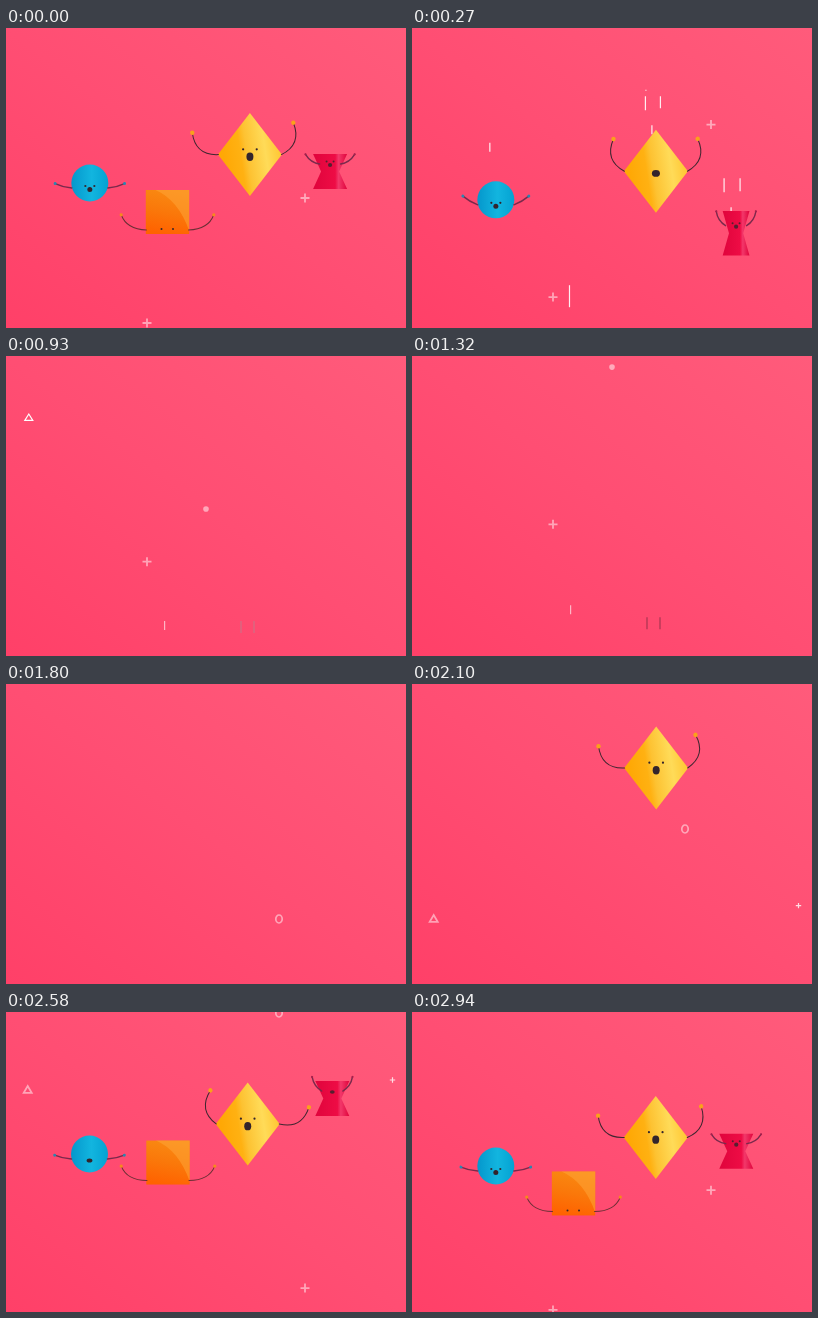
Animation of 400x300 px, one loop 2970 ms. Source, as an HTML page:

```html
<!DOCTYPE html>
<html lang="en">
<head>
<meta charset="utf-8">
<title>Falling shapes</title>
<style>
  html, body { margin: 0; width: 100%; height: 100%; overflow: hidden; background: #ff4d72; }
  svg { display: block; width: 100vw; height: 100vh; }
  .arm path { fill: none; stroke: #3f2630; stroke-width: 1; stroke-linecap: round; }
  .face { fill: #33242c; }
  .lines { stroke: #fff; stroke-width: 1.2; fill: none; }
  .bit { stroke: #fff; fill: none; }
  .soft { opacity: .5; filter: blur(.4px); }
  #circle, #red { filter: blur(.7px); }
  #square { filter: blur(.4px); }
  #circle .arm path, #red .arm path { stroke: #7a2a4c; stroke-width: 1.4; }
  #square .arm path { stroke: #6b2f35; }
</style>
</head>
<body>
<svg viewBox="0 0 400 300" preserveAspectRatio="none">
  <defs>
    <linearGradient id="sky" x1="0" y1="1" x2="1" y2="0">
      <stop offset="0" stop-color="#ff4068"/><stop offset=".5" stop-color="#ff4e73"/><stop offset="1" stop-color="#ff5b7b"/>
    </linearGradient>
    <linearGradient id="gold" x1="0" y1=".6" x2="1" y2=".4">
      <stop offset=".1" stop-color="#ffa805"/><stop offset=".36" stop-color="#ffb112"/>
      <stop offset=".46" stop-color="#fdc232"/><stop offset=".74" stop-color="#ffdb58"/><stop offset="1" stop-color="#ffc42e"/>
    </linearGradient>
    <linearGradient id="orange" x1=".6" y1="0" x2=".4" y2="1">
      <stop offset="0" stop-color="#f98a12"/><stop offset=".5" stop-color="#fa780a"/><stop offset="1" stop-color="#ff6200"/>
    </linearGradient>
    <linearGradient id="blue">
      <stop offset="0" stop-color="#0597cc"/><stop offset=".55" stop-color="#12b5df"/><stop offset="1" stop-color="#04a2d2"/>
    </linearGradient>
    <linearGradient id="crimson">
      <stop offset="0" stop-color="#e0043c"/><stop offset=".65" stop-color="#ee0c45"/>
      <stop offset=".75" stop-color="#f2386a"/><stop offset="1" stop-color="#e0043c"/>
    </linearGradient>
  </defs>
  <rect width="400" height="300" fill="url(#sky)"/>

  <path id="plusA" class="bit soft" d="M-4.5 0h9M0 -4.5v9" stroke-width="1.8"/>
  <path id="plusB" class="bit soft" d="M-4.5 0h9M0 -4.5v9" stroke-width="1.8"/>
  <path id="plusC" class="bit" d="M-2.7 0h5.4M0 -2.7v5.4" stroke-width="1.2" opacity=".8"/>
  <path id="triA" class="bit" d="M-4 3.2h8L0 -3.2z" stroke-width="1.2"/>
  <path id="triB" class="bit soft" d="M-4 3.4h8L0 -3.4z" stroke-width="1.8"/>
  <ellipse id="ring" class="bit soft" rx="3.2" ry="4" stroke-width="1.7"/>
  <circle id="dot" class="soft" r="2.8" fill="#fff"/>
  <path id="streakA" class="lines" d="M0 -4.5v9"/>
  <path id="streakB" class="lines" d="M0 -6v12"/>
  <path id="streakC" class="lines" d="M0 -6v12"/>

  <g id="circle">
    <path class="lines" d="M-6 -57v9" opacity=".6"/>
    <circle class="body" r="18.5" fill="url(#blue)"/>
    <g class="face" transform="translate(0 3)"><g class="eyes"><circle cx="-4.5" r="1.1"/><circle cx="4.5" r="1.1"/></g><g transform="translate(0 3.5)"><circle class="mouth" r="2.5"/></g></g>
  </g>
  <g id="square">
    <path class="lines" d="M-4 -73v22" opacity=".6"/>
    <g class="body"><rect x="-21.7" y="-22" width="43.4" height="44" fill="url(#orange)"/><path d="M-12 -22H21.7V19Q11 -12 -12 -22z" fill="#ffa438" opacity=".55"/></g>
    <g class="face" transform="translate(0 17)"><g class="eyes"><circle cx="-6" r="1"/><circle cx="5.5" r="1"/></g></g>
  </g>
  <g id="red">
    <path class="lines" d="M-12 -55v14M4 -55v13M-5 -26v6" opacity=".6"/>
    <path class="body" d="M-17 -17.5H17L9 0L17 17.5H-17L-9 0z" fill="url(#crimson)"/>
    <g class="face" transform="translate(0 -10)" opacity=".8"><g class="eyes"><circle cx="-3.5" r="1"/><circle cx="3.5" r="1"/></g><g transform="translate(0 3.5)"><circle class="mouth" r="2.1"/></g></g>
  </g>
  <g id="diamond">
    <path class="lines" d="M-10.5 -75v14M4.5 -75v12M-10 -81.5v1M-4 -46v9"/>
    <path class="body" d="M0 -41.5L32 0L0 41.5L-32 0z" fill="url(#gold)"/>
    <g class="face" transform="translate(0 -5.3)"><g class="eyes"><circle cx="-6.8" r="1.1"/><circle cx="6.8" r="1.1"/></g><g transform="translate(0 7.5)"><ellipse class="mouth" rx="3.5" ry="4.2"/></g></g>
  </g>
</svg>
<script>
const LOOP = 2970, STEP = 30;
const $ = id => document.getElementById(id);
const ramp = (t, from, to) => Math.min(1, Math.max(0, (t - from) / (to - from)));
// Swings around mid, lowest at the given time.
const wave = (mid, amp, period, low) => t => mid - amp * Math.cos(2 * Math.PI * (t - low) / period);

const flap = wave(9, 12, 1080, 2760), flutter = wave(9, 14, 900, 2900);
const wakeUp = t => ramp(t, 2600, 2900);

// x, y: place at the loop point; enter and drop: when the quick arrival and the fall begin.
const cast = [
  { id: 'diamond', x: 243, y: 126.6, glide: .0375, sway: 1.3, enter: 1920, drop: 3151,
    left: wave(20.5, 21, 855, 2955), right: wave(13.5, 24.5, 1080, 2580),
    shoulder: [31.5, 0], bend: [-23, 1], hand: [-26, -22], size: 2.2, tint: '#f9a11b',
    eyes: t => ramp(t, 3200, 3000) },
  { id: 'circle', x: 83.7, y: 155, glide: .033, sway: .2, enter: 2130, drop: 3145,
    left: flap, right: flap,
    shoulder: [18, 5], bend: [-9, 0], hand: [-17, -3], size: 1.5, tint: '#2a86b0', eyes: wakeUp },
  { id: 'square', x: 161.7, y: 184, glide: .085, sway: -.3, enter: 2190, drop: 3003,
    left: flap, right: flap,
    shoulder: [21, 18], bend: [-20, 1], hand: [-26.5, -13], size: 1.6, tint: '#f58a1c', eyes: wakeUp },
  { id: 'red', x: 325, y: 143.5, glide: .144, sway: -1.3, enter: 2250, drop: 3105, stretch: .27,
    left: flutter, right: flutter,
    shoulder: [10.5, -7.5], bend: [-9, -2], hand: [-13.5, -10.5], size: 1.1, tint: '#a5204c', eyes: wakeUp }
];

for (const c of cast) {
  c.el = $(c.id);
  const [hx, hy] = c.hand;
  const arm = `<g class="arm"><path d="M0 0Q${c.bend} ${c.hand}"/><circle cx="${hx}" cy="${hy}" r="${c.size}" fill="${c.tint}"/></g>`;
  c.el.insertAdjacentHTML('beforeend', arm + arm);
  c.arms = c.el.querySelectorAll('.arm');
  c.part = name => c.el.querySelector('.' + name);
}

const swing = wave(0, 1, 1080, 2565);

function height(c, t) {
  const arrival = 200 * Math.exp((c.enter - t) / 60);
  const fall = 250 * (Math.max(0, t - c.drop) / 300) ** 3;
  return c.y + c.glide * (t - LOOP) - arrival + fall;
}

function drawCharacter(c, t) {
  const y = height(c, t), visible = y > -60 && y < 380;
  c.el.style.display = visible ? '' : 'none';
  if (!visible) return;
  const [reach, level] = c.shoulder, awake = c.eyes(t);
  const long = 1 + (c.stretch || 0) * ramp(t, LOOP, 3240);
  const set = (el, value) => el.setAttribute('transform', value);
  set(c.el, `translate(${c.x + c.sway * swing(t)} ${y})`);
  set(c.part('body'), `scale(${1 / long} ${long})`);
  set(c.arms[0], `translate(${-reach} ${level}) rotate(${c.left(t)})`);
  set(c.arms[1], `translate(${reach} ${level}) scale(-1 1) rotate(${c.right(t)})`);
  c.part('eyes').style.opacity = awake;
  c.part('lines').style.opacity = .9 * ramp(t, c.drop - 30, c.drop + 80);
  const mouth = c.part('mouth');
  if (mouth) set(mouth, `scale(${1.15 - .15 * awake} ${.8 + .2 * awake})`);
}

// Marks rising at a steady speed, each known by one passing time and height.
const marks = [
  { id: 'plusA', x: 299, y: 170, at: 2970, speed: .272 },
  { id: 'plusB', x: 141, y: 295, at: 2970, speed: .096 },
  { id: 'plusC', x: 386.5, y: 68, at: 2580, speed: .32 },
  { id: 'triA', x: 22.8, y: 207.5, at: 3510, speed: .375 },
  { id: 'triB', x: 21.7, y: 77.5, at: 2580, speed: .327 },
  { id: 'ring', x: 273, y: 1, at: 2580, speed: .3 },
  { id: 'dot', x: 200, y: 295, at: 3510, speed: .364 },
  { id: 'streakA', x: 158.6, y: 285, at: 3510, speed: .04, from: 3420 },
  { id: 'streakB', x: 248, y: 275, at: 3510, speed: .01, from: 3420, darkens: true },
  { id: 'streakC', x: 235, y: 275, at: 3510, speed: .01, from: 3570, darkens: true }
];
const BLANK = 4530;

function drawMark(m, t) {
  const el = $(m.id);
  el.setAttribute('transform', `translate(${m.x} ${m.y - m.speed * (t - m.at)})`);
  if (m.from) el.style.opacity = .6 * ramp(t, m.from, m.from + 90);
  if (m.darkens) el.style.stroke = `color-mix(in srgb, #6e283c ${100 * ramp(t, 3570, 4170)}%, #fff)`;
  el.style.display = t < BLANK ? '' : 'none';
}

function draw(t) {
  // The scene begins at the blank moment and runs on past the loop point.
  const scene = t < BLANK - LOOP + STEP ? t + LOOP : t;
  cast.forEach(c => drawCharacter(c, scene));
  marks.forEach(m => drawMark(m, scene));
}

const start = performance.now();
function tick() {
  const t = (performance.now() - start) % LOOP;
  draw(Math.floor(t / STEP) * STEP);
  requestAnimationFrame(tick);
}
tick();
</script>
</body>
</html>
```
